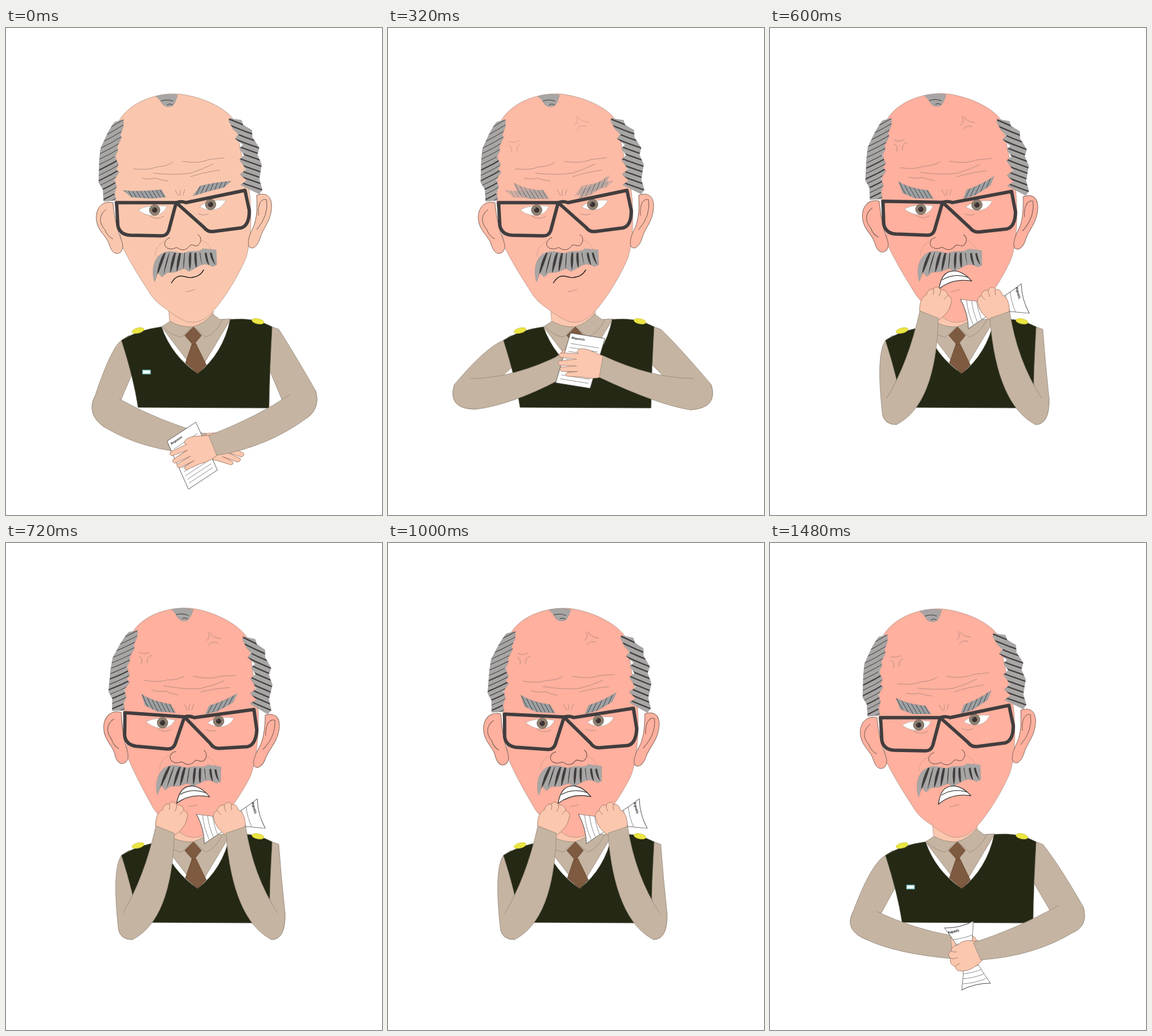
Recreate the animation shown at these times as an HTML page with a canvas. Size 612 by 792 pixels, loop 1.52 s.

```html
<!DOCTYPE html>
<html lang="en">
<head>
<meta charset="utf-8">
<title>Angry officer</title>
<style>
html, body { margin: 0; width: 100%; height: 100%; overflow: hidden; background: #fff; }
canvas { display: block; }
</style>
</head>
<body>
<canvas id="stage" width="612" height="792"></canvas>
<script>
const ctx = document.getElementById('stage').getContext('2d');
const LOOP = 1520, STEP = 40;
const SKIN = '#fbc7ae', SLEEVE = '#c5b4a1', SEAM = '#95887c', GREY = '#a8a6a5', DARK = '#413d3e';
const FIST_TIME = 560;

// Arm points: upper curve, elbow, elbow curve, base, lower curve, two cuff corners,
// upper forearm curve, crease, inner elbow.
const arms = {
  low: {
    left: [172,518, 145,598, 130,628, 160,649, 225,688, 312,692, 327,661, 250,640, 184,603, 187,605],
    right: [466,524, 504,590, 512,618, 490,634, 425,682, 343,695, 330,663, 410,632, 462,596, 449,604]
  },
  mid: {
    left: [158,520, 108,580, 96,620, 143,620, 200,613, 277,573, 284,530, 205,570, 134,570, 186,566],
    right: [471,515, 526,580, 538,618, 492,621, 440,613, 344,568, 350,533, 430,570, 498,570, 445,563]
  },
  near: {
    left: [168,537, 160,618, 155,645, 182,643, 257,612, 284,492, 258,472, 245,535, 172,598, 205,568],
    right: [452,535, 474,612, 475,645, 455,642, 379,613, 347,493, 369,473, 400,550, 461,597, 430,570]
  },
  up: {
    left: [172,530, 183,628, 186,645, 206,645, 270,612, 274,472, 244,460, 225,545, 190,602, 205,575],
    right: [448,545, 454,600, 456,645, 432,645, 369,612, 358,472, 390,461, 402,540, 442,602, 430,580]
  },
  rest: {
    left: [165,520, 135,600, 120,630, 157,645, 205,668, 297,676, 294,638, 235,628, 173,599, 181,602],
    right: [470,522, 510,592, 518,622, 494,633, 430,672, 343,678, 331,650, 400,628, 469,590, 456,598]
  }
};

// Paper: top left, top right, bottom left. Turn: left and right hand, in degrees.
const pose = (time, arm, paper, turn) => ({ time, ...arms[arm], paper, turn });
const crushed = [409,416, 422,464, 310,441];
const folded = [327,490, 371,507, 292,588];
const poses = [
  pose(0, 'low', [262,672, 309,641, 297,750], [20, -27]),
  pose(320, 'mid', [297,496, 353,505, 273,577], [-18, 0]),
  pose(480, 'near', [361,409, 395,452, 285,456], [-58, 42]),
  pose(560, 'up', crushed, [-55, 55]),
  pose(1000, 'up', crushed, [-55, 55]),
  pose(1140, 'mid', folded, [-8, 6]),
  pose(1200, 'mid', folded, [-8, 6]),
  pose(1480, 'rest', [284,626, 331,615, 312,727], [10, -25])
];

const clamp = v => Math.max(0, Math.min(1, v));
const ramp = (t, from, to) => clamp((t - from) / (to - from));
const mix = (a, b, k) => a.map((v, i) => v + (b[i] - v) * k);

function poseAt(t) {
  let i = 0;
  while (i < poses.length - 2 && t >= poses[i + 1].time) i++;
  const a = poses[i], b = poses[i + 1], k = ramp(t, a.time, b.time), out = {};
  for (const key of ['left', 'right', 'paper', 'turn']) out[key] = mix(a[key], b[key], k);
  return out;
}

function shape(d, fill, stroke, width = 0.8) {
  const path = new Path2D(d);
  if (fill) { ctx.fillStyle = fill; ctx.fill(path); }
  if (stroke) { ctx.strokeStyle = stroke; ctx.lineWidth = width; ctx.stroke(path); }
}
const line = (d, color, width) => shape(d, null, color, width);

function layer(draw, alpha = 1) {
  ctx.save();
  ctx.globalAlpha = alpha;
  draw();
  ctx.restore();
}

// Fills a shape and rules repeated strokes across it.
function hatch(d, fill, x, y, dx, dy, stepX, stepY, count, width) {
  layer(() => {
    shape(d, fill, '#999695', 0.6);
    ctx.clip(new Path2D(d));
    for (let i = 0; i < count; i++) {
      const px = x + i * stepX, py = y + i * stepY;
      line(`M${px} ${py}q${dx / 2} ${dy / 2 + 2} ${dx} ${dy}`, DARK, width(i));
    }
  }, ctx.globalAlpha);
}

function dot(x, y, r, fill, stroke) {
  shape(`M${x - r} ${y}a${r} ${r} 0 1 0 ${2 * r} 0a${r} ${r} 0 1 0 ${-2 * r} 0`, fill, stroke);
}

function upperArm(p, start, pit) {
  const [cx, cy, ex, ey, qx, qy, bx, by] = p;
  shape(`M${start}Q${cx} ${cy} ${ex} ${ey}Q${qx} ${qy} ${bx} ${by}L${p[18]} ${p[19]}L${pit}Z`, SLEEVE, SEAM);
}

function forearm(p) {
  const at = i => p[2 * i] + ' ' + p[2 * i + 1];
  shape(`M${at(1)}Q${at(2)} ${at(3)}Q${at(4)} ${at(5)}L${at(6)}Q${at(7)} ${at(8)}`, SLEEVE, SEAM);
}

const OPEN_HAND = 'M-4 -17C12 -22 24 -32 36 -28Q42 -24 37 -21L66 -22Q71 -18 66 -15L40 -12' +
  'L68 -9Q72 -5 67 -2L40 -1L66 1Q69 5 64 8L38 8L56 10Q60 14 55 16L32 17Q14 22 -4 16Z';
const FIST = 'M-4 -16C8 -25 18 -26 24 -22Q34 -26 38 -18Q47 -18 44 -8Q50 1 43 7Q45 16 35 19Q20 26 -4 16Z';
const KNUCKLES = 'M38 -18Q35 -14 30 -13M44 -8Q40 -4 33 -4M43 7Q39 6 34 6';

function hand(p, degrees, side, fist) {
  layer(() => {
    ctx.translate((p[10] + p[12]) / 2, (p[11] + p[13]) / 2);
    ctx.rotate(degrees * Math.PI / 180);
    ctx.scale(side, 1);
    shape(fist ? FIST : OPEN_HAND, SKIN, '#a47b6b', 0.8);
    if (fist) line(KNUCKLES, '#a47b6b', 0.8);
  });
}

function paper([x, y, rx, ry, bx, by], crumpled) {
  const w = 56, h = 85;
  layer(() => {
    ctx.transform((rx - x) / w, (ry - y) / w, (bx - x) / h, (by - y) / h, x, y);
    const d = crumpled
      ? 'M0 0Q28 5 56 0Q41 30 37 42Q43 60 56 85Q28 80 0 85Q15 60 19 42Q15 25 0 0Z'
      : `M0 0H${w}V${h}H0Z`;
    shape(d, '#fff', '#555', 0.8);
    ctx.clip(new Path2D(d));
    ctx.fillStyle = '#222';
    ctx.font = 'italic bold 5px "Open Sans", sans-serif';
    ctx.fillText('Requests', 4, 9);
    for (let i = 0; i < 10; i++) {
      const ly = 17 + i * 6.7;
      line(`M5 ${ly}q23 ${crumpled ? 3 : 0} 46 0`, '#777', 0.7);
    }
  });
}

function body() {
  shape('M264 450L267 485L305 500L338 480L337 455Z', SKIN, '#b6978a');
  shape('M253 486L267 477Q285 487 303 486Q322 482 336 465L348 474L366 473L312 563Z', SLEEVE, SEAM);
  shape('M188 508Q215 491 253 486Q270 534 312 562Q353 530 365 474Q405 470 433 486Q429 550 428 618L215 617Q208 570 188 508Z',
    '#242814', '#4b4c40', 0.7);
  shape('M303 513L309 513L326 548L312 562L292 545Z', '#7e5a40', '#654731');
  shape('M305 486L318 500L305 516L291 500Z', '#7e5a40', '#654731');
  line('M255 485Q265 498 285 503L302 487M307 487L325 503Q341 497 353 474', SEAM);
  for (const [x, y, turn] of [[215, 492, -0.25], [410, 477, 0.2]]) {
    ctx.beginPath();
    ctx.ellipse(x, y, 10, 4.2, turn, 0, 7);
    ctx.fillStyle = '#ebe642';
    ctx.fill();
    ctx.strokeStyle = '#c9c33a';
    ctx.stroke();
  }
  shape('M222.5 556.5h12.5v6h-12.5z', '#f4ffff', '#7fc4c8', 1.3);
}

function hair() {
  hatch('M177 153L191 149L191 160L186 174L188 178L181 193L182 200L177 209L183 222L179 230L184 234L176 247L180 258L176 268L179 280L159 282L158 263L151 251L152 215L154 196L165 172L173 158Z',
    GREY, 149, 172, 44, -24, 0, 8.6, 15, i => i > 6 && i % 2 ? 2 : 1);
  hatch('M363 147L383 150L386 158L400 166L401 178L412 195L409 206L416 222L412 246L417 263L412 270L382 255L392 248L381 238L391 230L380 214L388 207L380 196L386 190L373 180L379 173L370 165L363 152Z',
    GREY, 358, 146, 64, 24, 0, 9.5, 13, () => 2.2);
  shape('M244 111Q262 106 279 109Q278 116 272 126Q262 131 255 124Q251 116 244 111Z', GREY, '#999');
  line('M252 119Q262 115 272 119M262 125Q267 122 271 125', DARK, 1);
}

function brows(left, right) {
  hatch(left, '#9da1a3', 184, 248, 18, 32, 6.5, 0, 13, () => 0.9);
  hatch(right, '#9da1a3', 293, 280, 18, -42, 6.5, 0, 12, () => 0.9);
}

function eye(d, x, y) {
  shape(d, '#fff', '#b5a49b', 0.7);
  dot(x, y, 8.6, '#8f8070', '#6d6258');
  dot(x, y, 4.3, '#393132');
  dot(x - 2, y - 2, 1, '#77706c');
}

function moustache() {
  layer(() => {
    const d = 'M256 366C272 359 284 370 292 365C304 361 314 366 320 359L342 361L343 385L336 388Q324 380 312 388L298 396L290 391L275 397L262 398L254 405L247 398L242 413C236 395 240 372 256 366Z';
    shape(d, GREY, '#999', 0.6);
    ctx.clip(new Path2D(d));
    for (let i = 0; i < 10; i++) {
      const x = 257 + i * 8.3, lean = (i - 4.7) * 2.5, w = i % 3 === 1 ? 1 : 3;
      shape(`M${x} 366Q${x + lean / 2 - w} 380 ${x + lean} ${404 - i * 2}Q${x + lean / 2 + w} 386 ${x + w} 365Z`, DARK);
    }
  });
}

function head(t, anger, teeth) {
  const skin = `rgb(${mix([250, 199, 174], [255, 176, 158], anger).map(Math.round)})`;
  const crease = '#b48d80';
  shape('M177 285L180 160C190 130 230 107 275 107C315 109 360 130 372 152L396 265C402 315 396 360 390 375C375 410 352 445 333 465Q316 482 296 478C285 475 270 464 262 458Q241 445 232 428Q205 387 190 357Z',
    skin, '#b49589');
  hair();
  shape('M174 284C155 280 146 295 147 310C148 330 164 338 168 352C172 366 180 370 187 364C192 358 190 350 186 340C178 320 176 300 174 284', skin, '#896b60', 1);
  shape('M408 272C425 266 434 275 432 295C430 315 419 325 414 340C410 355 402 361 396 356C392 350 396 336 402 325C409 310 409 290 408 272', skin, '#896b60', 1);
  line('M163 295C150 305 152 318 161 328Q165 339 174 343M411 305C409 286 416 277 424 279Q428 305 408 328', '#775c52', 1);

  line('M207 229Q230 232 245 226Q262 225 272 218M287 217Q315 221 330 214Q345 212 356 211M240 236Q275 240 300 236Q320 230 337 221M221 244Q235 247 242 244Q255 248 264 249M300 242Q320 235 348 231', crease, 0.9);
  line('M275 263L281 273M284 263L283 273M291 262L288 272M234 306Q246 313 257 306M313 302Q322 306 330 302M293 429Q300 428 308 425', crease, 0.9);
  line('M257 347Q243 355 242 372M318 345Q330 350 334 360', '#d09d8c', 0.8);
  layer(() => line('M196 184Q204 188 213 183M196 191Q203 192 201 203M217 188Q209 190 210 201M306 143Q311 152 304 158M310 144Q312 152 327 153M308 165Q312 157 323 160', crease, 0.9), anger);

  layer(() => brows('M191 264Q210 267 253 263L260 275L236 277L204 275Z',
    'M304 273L316 257Q340 251 366 249L355 259L335 264Z'), 1 - anger);
  layer(() => brows('M205 252Q222 262 253 265L262 278L232 278L212 270Z',
    'M311 277L316 263Q340 254 360 240L354 255L330 271Z'), anger);

  eye('M215 296Q232 286 262 290Q256 305 238 305Q225 304 215 296Z', 242, 296);
  eye('M315 291Q328 278 358 280Q350 297 332 296Q322 295 315 291Z', 333, 287);
  line('M180 284L277 284L265 329Q262 338 253 338L202 337Q185 336 182 321ZM277 284Q285 281 293 284L389 264L396 297Q396 321 383 325L337 331Q328 332 322 324Z', DARK, 5.5);

  line('M267 341C256 344 255 357 266 359C274 361 276 355 280 358C287 363 294 361 299 354C304 350 308 357 313 353C319 347 318 339 312 336', '#6f5148', 1);
  moustache();
  if (teeth) {
    shape('M274 425C277 405 283 395 300 395Q315 397 327 411Q296 406 274 425Z', '#fff', '#222', 1.1);
    line('M279 410Q298 398 321 405', '#222', 1);
  } else {
    line('M269 415C280 396 290 406 300 406Q316 405 322 393', '#111', 1.2);
  }
}

function draw(t) {
  const p = poseAt(t), fist = t >= FIST_TIME;
  const tilt = 4 * (ramp(t, 560, 700) - ramp(t, 960, 1100));
  ctx.fillStyle = '#fff';
  ctx.fillRect(0, 0, 612, 792);
  upperArm(p.left, '200 500L188 508', '215 540');
  upperArm(p.right, '425 484L433 486L444 490', '422 540');
  body();
  layer(() => {
    ctx.translate(300, 476);
    ctx.rotate(tilt * Math.PI / 180);
    ctx.translate(-300, -476);
    head(t, ramp(t, 0, 560), fist);
  });
  hand(p.left, p.turn[0], 1, fist);
  forearm(p.left);
  paper(p.paper, fist);
  hand(p.right, p.turn[1], -1, fist);
  forearm(p.right);
}

const started = performance.now();
function tick() {
  const t = (performance.now() - started) % LOOP;
  draw(Math.floor(t / STEP) * STEP);
  requestAnimationFrame(tick);
}
ctx.lineJoin = 'round';
tick();
</script>
</body>
</html>
```
